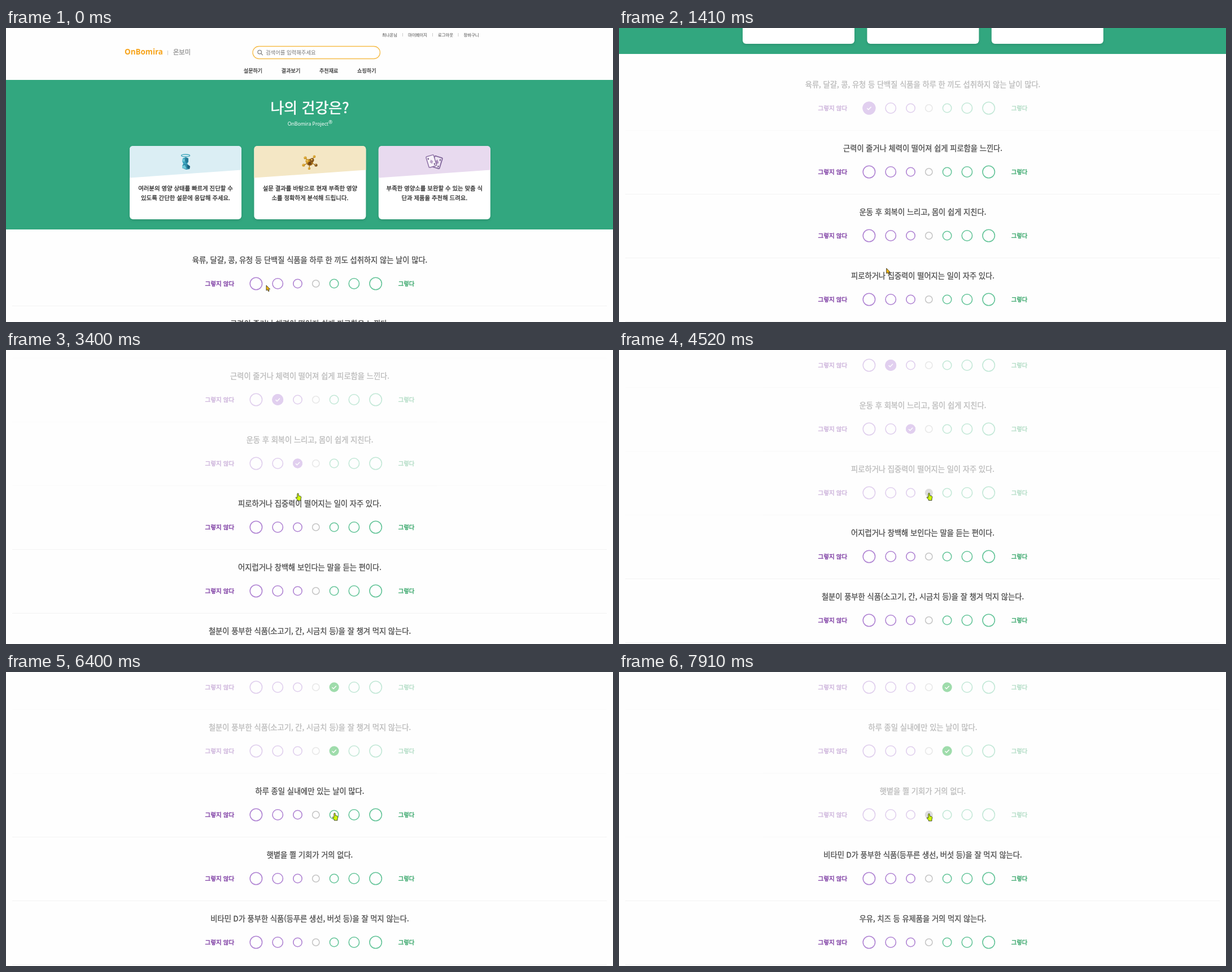
An HTML page that plays this animation: 1075 by 521 pixels, repeating every 8000 ms.

```html
<!DOCTYPE html>
<html lang="ko">
<head>
<meta charset="utf-8">
<title>건강 설문</title>
<style>
  html, body { margin: 0; width: 100%; height: 100%; overflow: hidden; background: #fefefe; }
  svg { display: block; width: 1075px; height: 521px; }
  text { font-family: "Noto Sans CJK KR", "Noto Sans", sans-serif; white-space: pre; }
  .latin { font-family: "Noto Sans", "Open Sans", sans-serif; }
  .card { filter: drop-shadow(0 2px 2px rgba(0, 0, 0, .12)); }
</style>
</head>
<body>
<svg viewBox="0 0 1075 521">
  <g id="page">
    <g id="header">
      <rect x="437" y="32.5" width="225.5" height="22" rx="11" fill="#fff" stroke="#f6bd4b" stroke-width="1.3"/>
      <g fill="none" stroke="#858585" stroke-width="1.3" stroke-linecap="round">
        <circle cx="449.2" cy="42.6" r="3.3"/>
        <path d="M451.7 45.1l2.6 2.6"/>
      </g>
    </g>
    <rect y="92" width="1075" height="265" fill="#32a77f"/>
    <g id="hero"></g>
    <g id="icons">
      <g transform="translate(318 237)">
        <ellipse cy="-11" rx="7.6" ry="2" fill="none" stroke="#43a9bd" stroke-width="1.3"/>
        <path d="M-5-6L0-8 5-6 5 0 3 4-4 4-6-1Z" fill="#3ba3bd"/>
        <path d="M0-8L5-6 5 0 1 3-1-3Z" fill="#257b98"/>
        <path d="M-4 4L3 4 8 8 7 13 1 14-6 11-6 7Z" fill="#2c8ba8"/>
        <path d="M-6 7L-1 6 2 13-6 11ZM-5-5L-1-4-2 0-6-1Z" fill="#70c8d7"/>
        <path d="M3 5L8 8 7 13 3 11Z" fill="#1d617d"/>
      </g>
      <g id="molecule" transform="translate(538 238)"></g>
      <g transform="translate(758.5 237)">
        <g transform="rotate(17 5 1)">
          <rect x="-2" y="-9" width="14" height="20" rx="1.5" fill="#eee5f3" stroke="#80659a" stroke-width="1.8"/>
          <path d="M4-4l4 5-4 5-3-5Z" fill="#a78bb9"/>
          <path d="M8-6h2v3H8ZM8 6h2v3H8Z" fill="#6f5388"/>
        </g>
        <g transform="rotate(-17 -5 0)">
          <rect x="-12" y="-11" width="14" height="20" rx="1.5" fill="#f7f2f9" stroke="#8d71a5" stroke-width="1.5"/>
          <path d="M-5-4l3 4-3 4-3-4Z" fill="#b9a2c8"/>
          <path d="M-10-8h2v3h-2ZM-2 4h2v3h-2Z" fill="#6f5388"/>
        </g>
      </g>
    </g>
    <g id="survey"></g>
  </g>
  <g id="cursor" stroke="#222" stroke-width=".8" stroke-linejoin="round">
    <path id="arrow" fill="#f5b70c" d="M0 0V9.3L2.1 7.5 3.6 10.8 5.2 10.1 3.8 6.9H6.6Z"/>
    <path id="hand" fill="#cdf80a" d="M-1.2 1.2Q-1.2 0 0 0T1.2 1.2V4.4L4.6 5.1Q6 5.6 5.8 7.4L5 10.5V13H-.8V11.6L-3.6 8.4Q-4.3 7.2-3.2 6.8L-1.2 7.8Z"/>
  </g>
</svg>
<script>
const $ = id => document.getElementById(id);

function add(parent, tag, attrs) {
  const el = document.createElementNS("http://www.w3.org/2000/svg", tag);
  for (const key in attrs) el.setAttribute(key, attrs[key]);
  return parent.appendChild(el);
}

// y is the optical middle of the line; bold is an outline that thickens the strokes
function label(parent, str, x, y, size, color, { anchor = "middle", bold = 0, ...rest } = {}) {
  const el = add(parent, "text", {
    x, y: y + size * .37, "font-size": size, fill: color, stroke: color,
    "stroke-width": bold, "text-anchor": anchor, ...rest
  });
  el.textContent = str;
}

// Header
const header = $("header");
[["최나온님", 679.5], ["마이페이지", 729], ["로그아웃", 778.5], ["장바구니", 824]]
  .forEach(([s, x]) => label(header, s, x, 12, 7.4, "#444"));
for (const x of [702.5, 755.5, 801]) add(header, "rect", { x: x - .5, y: 9, width: 1, height: 6, fill: "#ccc" });
label(header, "OnBomira", 210, 42, 13.4, "#f7a41b", { anchor: "start", "font-weight": 700, class: "latin" });
add(header, "rect", { x: 286, y: 40, width: 1, height: 8, fill: "#ccc" });
label(header, "온보미", 311.5, 43, 11.3, "#999", { bold: .35 });
label(header, "검색어를 입력해주세요", 460, 43.5, 9.35, "#777", { anchor: "start" });
["설문하기", "결과보기", "추천재료", "쇼핑하기"]
  .forEach((s, i) => label(header, s, 437.5 + 67.1 * i, 75.5, 9.1, "#333", { bold: .25 }));

// Green band
const hero = $("hero");
label(hero, "나의 건강은?", 538, 141, 26, "#fff", { bold: .6 });
label(hero, "OnBomira Project", 571, 169.5, 8.7, "#fff", { anchor: "end", class: "latin" });
label(hero, "®", 574.6, 167, 8.7, "#fff", { class: "latin" });
[
  ["#dbeef4", "여러분의 영양 상태를 빠르게 진단할 수", "있도록 간단한 설문에 응답해 주세요."],
  ["#f4e7c5", "설문 결과를 바탕으로 현재 부족한 영양", "소를 정확하게 분석해 드립니다."],
  ["#e8daef", "부족한 영양소를 보완할 수 있는 맞춤 식", "단과 제품을 추천해 드려요."]
].forEach(([tint, ...lines], i) => {
  const x = 219 + 220.4 * i;
  add(hero, "rect", { x, y: 209, width: 198, height: 130, rx: 6, fill: "#fff", class: "card" });
  add(hero, "path", { d: `M${x} 215q0-6 6-6h186q6 0 6 6V251.5L${x} 265.5Z`, fill: tint });
  lines.forEach((s, n) => label(hero, s, x + 99, 284.5 + 16.5 * n, 10.4, "#2d2d2d", { bold: .3 }));
});

const atoms = [[-8, -8, 2.6], [8, -10, 2.4], [11, 5, 2.6], [-11, 5, 2.6], [-1, 11, 2.2], [4, -4, 3.5], [-4, -2, 3.5]];
for (const [x, y] of atoms) add($("molecule"), "path", { d: `M0 0L${x} ${y}`, stroke: "#9b6a1c", "stroke-width": 1.2 });
add($("molecule"), "circle", { r: 6, fill: "#a9711a" });
atoms.forEach(([cx, cy, r], i) => {
  add($("molecule"), "circle", { cx, cy, r, fill: i % 3 == 2 ? "#805019" : "#cf9927" });
  add($("molecule"), "circle", { cx: cx - .6, cy: cy - .7, r: r * .4, fill: "#f0c961" });
});
add($("molecule"), "circle", { cy: 2, r: 3, fill: "#714616" });

// Questions
const GAP = 113, FADED = .38, RING = 1.6;
const PURPLE = "#b084d3", GREY = "#c6c6c6", GREEN = "#66c59a";
// Centre, outer radius and colour; symmetric around the grey one
const options = [
  [442.9, 11.5, PURPLE], [481.2, 10, PURPLE], [516.5, 8.5, PURPLE], [548.8, 7, GREY],
  [581.1, 8.5, GREEN], [616.4, 10, GREEN], [654.7, 11.5, GREEN]
];
const fills = { [PURPLE]: "#b385d8", [GREY]: "#a8a8a8", [GREEN]: "#08a626" };
// Click time and chosen option of each question
const answers = [
  [793, 0], [2153, 1], [2947, 2], [4253, 3], [5090, 4], [5790, 4], [6453, 4], [7630, 3]
];
const rows = [
  "육류, 달걀, 콩, 유청 등 단백질 식품을 하루 한 끼도 섭취하지 않는 날이 많다.",
  "근력이 줄거나 체력이 떨어져 쉽게 피로함을 느낀다.",
  "운동 후 회복이 느리고, 몸이 쉽게 지친다.",
  "피로하거나 집중력이 떨어지는 일이 자주 있다.",
  "어지럽거나 창백해 보인다는 말을 듣는 편이다.",
  "철분이 풍부한 식품(소고기, 간, 시금치 등)을 잘 챙겨 먹지 않는다.",
  "하루 종일 실내에만 있는 날이 많다.",
  "햇볕을 쬘 기회가 거의 없다.",
  "비타민 D가 풍부한 식품(등푸른 생선, 버섯 등)을 잘 먹지 않는다.",
  "우유, 치즈 등 유제품을 거의 먹지 않는다."
].map((question, i) => {
  const g = add($("survey"), "g", { transform: `translate(0 ${GAP * i})` });
  label(g, question, 538, 411, 13.25, "#505050", { bold: .35 });
  label(g, "그렇지 않다", 378.3, 453, 10.6, "#7d3ca3", { bold: .4 });
  label(g, "그렇다", 709, 453, 10.4, "#35a568", { bold: .4 });
  for (const [cx, r, color] of options)
    add(g, "circle", { cx, cy: 453, r: r - RING / 2, fill: "none", stroke: color, "stroke-width": RING });
  add(g, "rect", { x: 11, y: 492, width: 1053, height: 1, fill: "#f3f3f3" });
  if (!answers[i]) return { g };
  const [cx, r, color] = options[answers[i][1]];
  const disc = add(g, "circle", { cx, cy: 453, r, fill: fills[color] });
  const tick = add(g, "path", {
    d: `M${cx - 3.6} 453.2l2.5 2.5 4.8-5`, fill: "none", stroke: "#fff", "stroke-width": 1.5
  });
  return { g, disc, tick };
});

// Motion
const LOOP = 8000, FADE = 200, WAIT = 302, SCROLL = 320;
const path = [
  [0, 461, 456], [200, 442, 447], [950, 442, 447], [1200, 469, 447], [1300, 473, 438],
  [1900, 483, 256], [2750, 483, 256], [2900, 517, 254], [3700, 517, 254], [4100, 549, 253.5],
  [4700, 549, 253.5], [4900, 582, 250], [7050, 582, 250], [7500, 549, 251], [LOOP, 549, 251]
];
const clamp = v => Math.min(1, Math.max(0, v));
const ease = v => (1 - Math.cos(Math.PI * clamp(v))) / 2;

function draw(t) {
  let scroll = 0;
  answers.forEach(([click], i) => {
    const { g, disc, tick } = rows[i], age = t - click;
    const faded = ease(age / FADE);
    g.setAttribute("opacity", 1 - (1 - FADED) * faded);
    disc.setAttribute("opacity", faded);
    tick.setAttribute("opacity", clamp((age - 300) / 100));
    scroll += (i ? GAP : 313) * ease((age - WAIT) / SCROLL);
  });
  $("page").setAttribute("transform", `translate(0 ${-Math.round(scroll)})`);

  const n = path.findIndex(p => p[0] > t);
  const [t0, x0, y0] = path[n - 1], [t1, x1, y1] = path[n];
  const k = ease((t - t0) / (t1 - t0));
  const resting = x0 == x1 && y0 == y1;
  $("cursor").setAttribute("transform", `translate(${x0 + (x1 - x0) * k} ${y0 + (y1 - y0) * k})`);
  $("hand").setAttribute("visibility", resting ? "visible" : "hidden");
  $("arrow").setAttribute("visibility", resting ? "hidden" : "visible");
}

const start = performance.now();
function tick() {
  const t = (performance.now() - start) % LOOP;
  draw(Math.floor((t + 10) / 100) * 100 % LOOP);
  requestAnimationFrame(tick);
}
tick();
</script>
</body>
</html>
```
